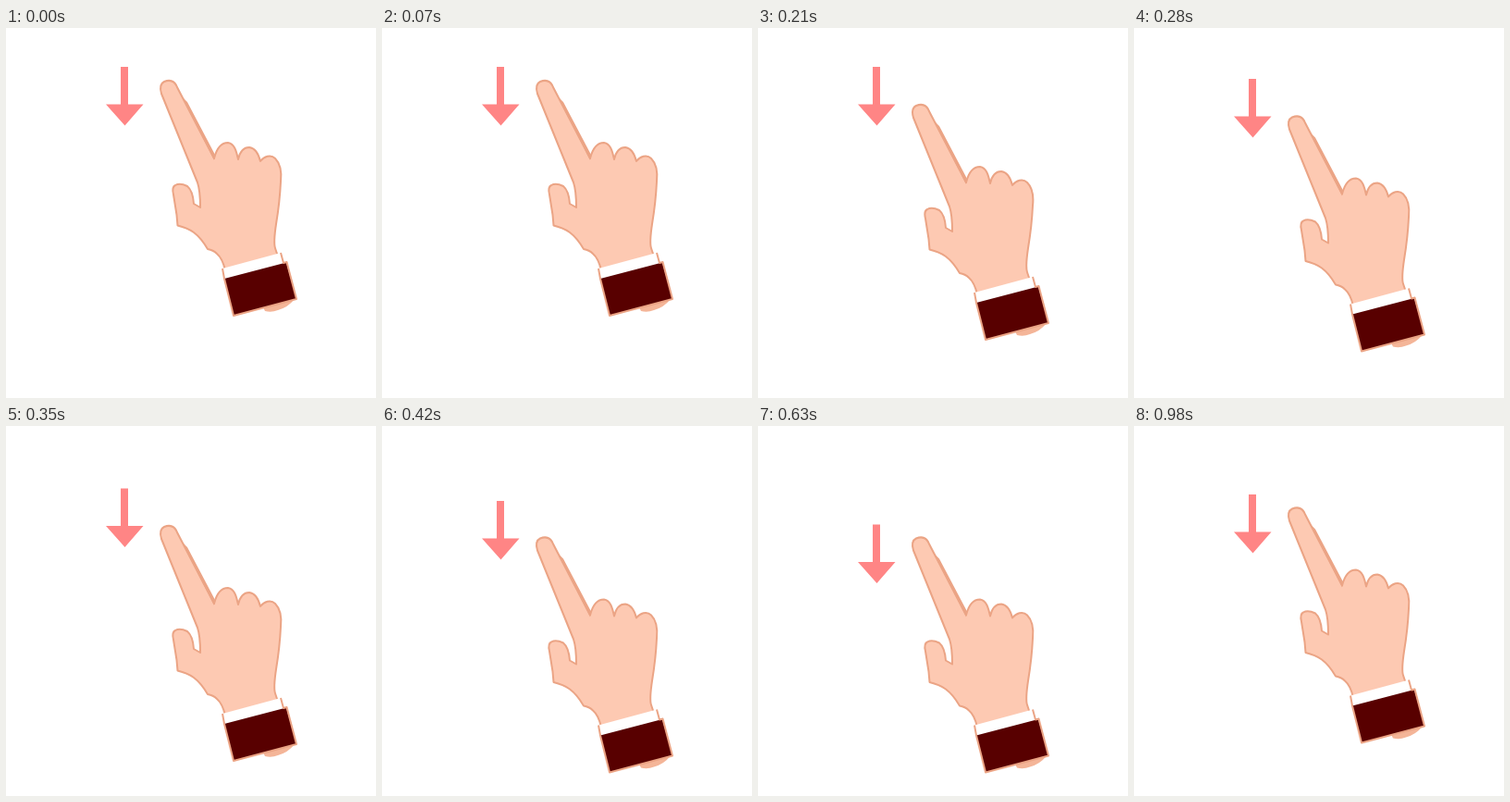
Animation of 400x400 px, one loop 1050 ms. Source, as an HTML page:

```html
<!DOCTYPE html>
<html>
<head>
<meta charset="utf-8">
<style>
  html, body { margin: 0; width: 100%; height: 100%; overflow: hidden; background: #fff; }
  svg { display: block; width: 100%; height: 100%; }
</style>
</head>
<body>
<svg viewBox="0 0 400 400">
  <path id="arrow" fill="#ff8585" d="M124 42H132V82.5H148.5L128.5 105.5L108 82.5H124Z"/>
  <g id="hand" stroke="#eba485" stroke-width="2" stroke-linejoin="round">
    <path fill="#f4b598" stroke="none" d="M278 302L312 293Q305 302 294 305Q287 308 280 306Z"/>
    <path fill="#fdc9b2" d="M237 262Q234 249 228 244Q224 240 218 239
      Q211 227 203 221Q196 216 185.5 213.5L184.5 202L181 180
      Q179 172 183 170Q188 167 196 171Q202 176 203 190L210 194
      Q210 176 207 167L168 71Q165 61 171 58Q181 54 185 64L225 141
      C228 129 233 124 240 124C247 125 249 133 251 142
      C253 133 257 129 263 129C270 130 273 136 275 144
      C279 139 286 136 291 141C297 147 298 157 297 166
      Q296 188 292 212Q289 232 291 238L294 247Z"/>
    <path fill="#eba485" stroke="none" d="M190 74L196 80L226 137L225 143L219 131Z"/>
    <path fill="#fff" stroke="none" d="M234 260L297 243L300 255L236 272Z"/>
    <path fill="#580000" stroke="none" d="M236 271L303 253.5L314 293L246 311Z"/>
    <path fill="none" d="M234 260L236 271L246 311L314 293L303.5 253L300 254L297 243"/>
  </g>
</svg>
<script>
  const STEP = 70, LOOP = 1050;
  const handY  = [0, 0, 13, 26, 38.5, 51, 63.5, 63.5, 63.5, 63.5];
  const arrowY = [0, 0, 0, 0, 13, 25.5, 39, 52, 61, 64.5];
  const hand = document.getElementById('hand');
  const arrow = document.getElementById('arrow');
  const move = (el, y) => el.setAttribute('transform', `translate(0 ${y})`);
  const start = performance.now();

  function draw() {
    const t = (performance.now() - start) % LOOP;
    const i = Math.min(9, Math.floor(t / STEP));
    const back = t >= 980; // halfway up before the restart
    move(hand, back ? 31.5 : handY[i]);
    move(arrow, back ? 32 : arrowY[i]);
    requestAnimationFrame(draw);
  }
  draw();
</script>
</body>
</html>
```
